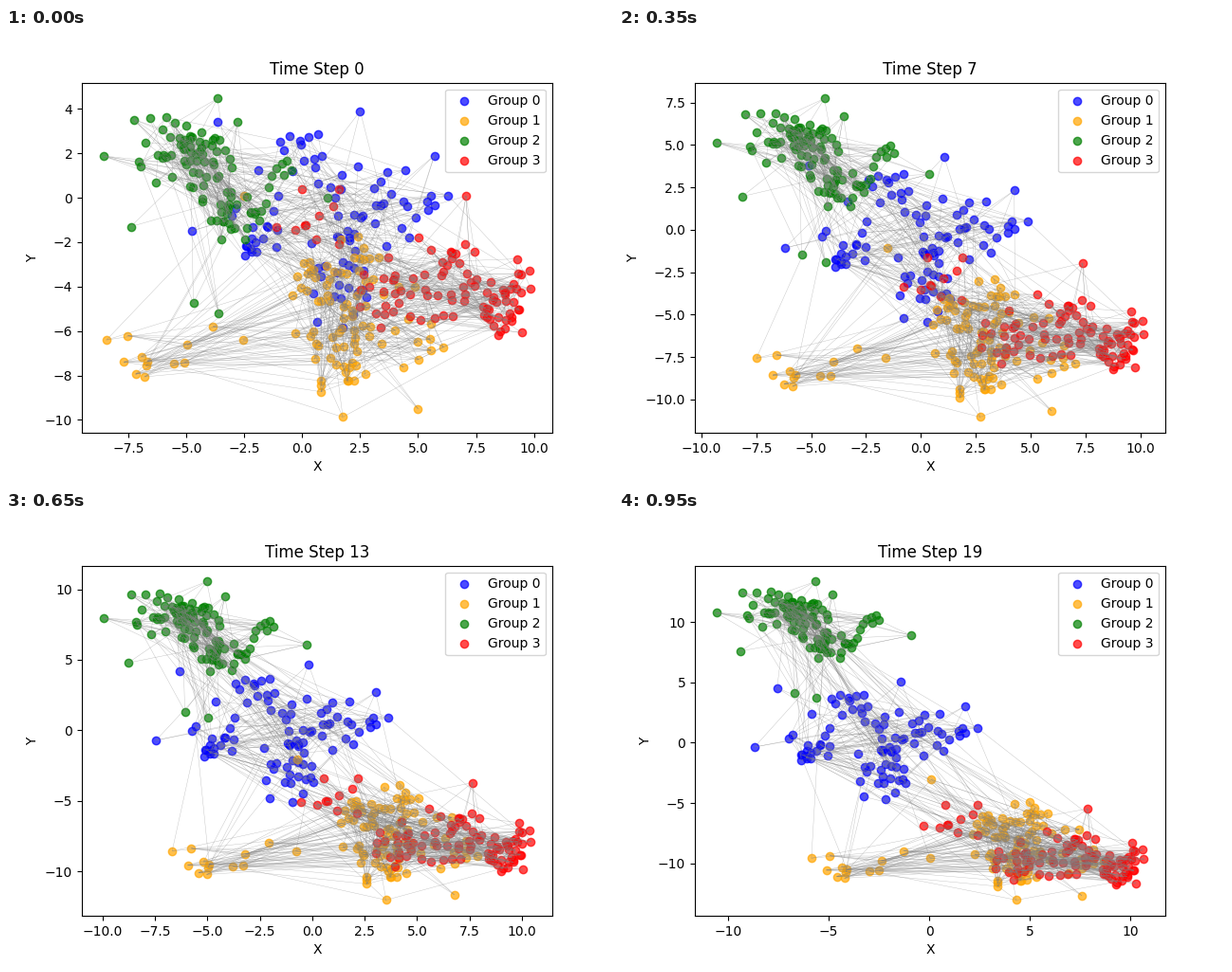
These frames come from a looping animation (640 px wide and 480 px high, 1000 ms). A matplotlib script:

```python
import numpy as np
import matplotlib.pyplot as plt
from matplotlib.animation import FuncAnimation
from matplotlib.collections import LineCollection

STEPS = 20
rng = np.random.default_rng(7)


def blob(count, center, spread):
    """Bounded bell-shaped cloud of points."""
    return center + rng.triangular(-2.4, 0, 2.4, (count, 2)) * spread


# Each group: a few outlying points, then its clouds.
groups = {
    "blue": np.vstack([
        [(-4.77, -1.49), (-3.65, 3.4), (2.5, 3.9), (5.7, 1.9), (6.3, .1), (.65, -5.6)],
        blob(28, (2.0, -3.2), (.75, 1.2)),
        blob(17, (-2.3, -1.6), (.65, .75)),
        blob(26, (3.6, -.4), (1.1, 1.2)),
        blob(16, (.2, 1.4), (1.4, .8)),
    ]),
    "orange": np.vstack([
        [(-8.45, -6.4), (-3.85, -5.8), (-2.55, -6.4), (1.75, -9.87), (5, -9.5), (-2.5, .1)],
        blob(42, (1.5, -3.8), (1.0, 1.2)),
        blob(28, (1.7, -7.3), (.75, 1.0)),
        blob(14, (4.4, -5.3), (.8, 1.3)),
        blob(10, (-6.1, -7.4), (.9, .55)),
    ]),
    "green": np.vstack([
        [(-8.59, 1.88), (-3.66, 4.465), (-7.4, -1.3), (-4.7, -4.75), (-3.6, -5.2), (1.1, 0)],
        blob(58, (-5.0, 1.9), (1.15, .95)),
        blob(32, (-2.9, -.6), (.9, .85)),
        blob(6, (-.8, 1.4), (.45, .35)),
    ]),
    "red": np.vstack([
        [(7.07, .08), (9.87, -4.1), (9.8, -3.3), (1.6, .4), (0, .4), (-1.1, -1.3)],
        blob(38, (8.5, -4.5), (.56, .85)),
        blob(26, (6.5, -3.7), (.8, 1.1)),
        blob(22, (3.8, -4.3), (.9, .9)),
        blob(7, (.7, -1.2), (.6, .6)),
    ]),
}
velocity = np.array([(-.206, .06), (.1365, -.1663), (-.1053, .468), (.0427, -.292)])

start = np.vstack(list(groups.values()))
label = np.repeat(range(4), [len(g) for g in groups.values()])

# Number of random links between each pair of groups.
links = {(0, 0): 150, (1, 1): 220, (2, 2): 220, (3, 3): 200, (0, 1): 40,
         (0, 2): 45, (1, 3): 80, (0, 3): 10, (1, 2): 4}


def pick(group, count):
    return rng.choice(np.flatnonzero(label == group), count)


edges = np.vstack([np.column_stack([pick(a, n), pick(b, n)])
                   for (a, b), n in links.items()])

fig, ax = plt.subplots(figsize=(6.4, 4.8), dpi=100)
dots = [ax.scatter(*points.T, color=color, alpha=.7, label=f"Group {i}")
        for i, (color, points) in enumerate(groups.items())]
lines = LineCollection(start[edges], colors="gray", linewidths=.3, alpha=.5, zorder=2)
ax.add_collection(lines)
ax.set_xlabel("X")
ax.set_ylabel("Y")
ax.legend(loc="upper right")


def update(step):
    pos = start + velocity[label] * step
    for i, dot in enumerate(dots):
        dot.set_offsets(pos[label == i])
    lines.set_segments(pos[edges])
    low, high = pos.min(axis=0), pos.max(axis=0)
    pad = .05 * (high - low)
    (left, bottom), (right, top) = low - pad, high + pad
    ax.set_xlim(left, right)
    ax.set_ylim(bottom, top)
    ax.set_title(f"Time Step {step}")
    return [*dots, lines]


anim = FuncAnimation(fig, update, frames=STEPS, interval=50, repeat=True)
plt.show()
```
